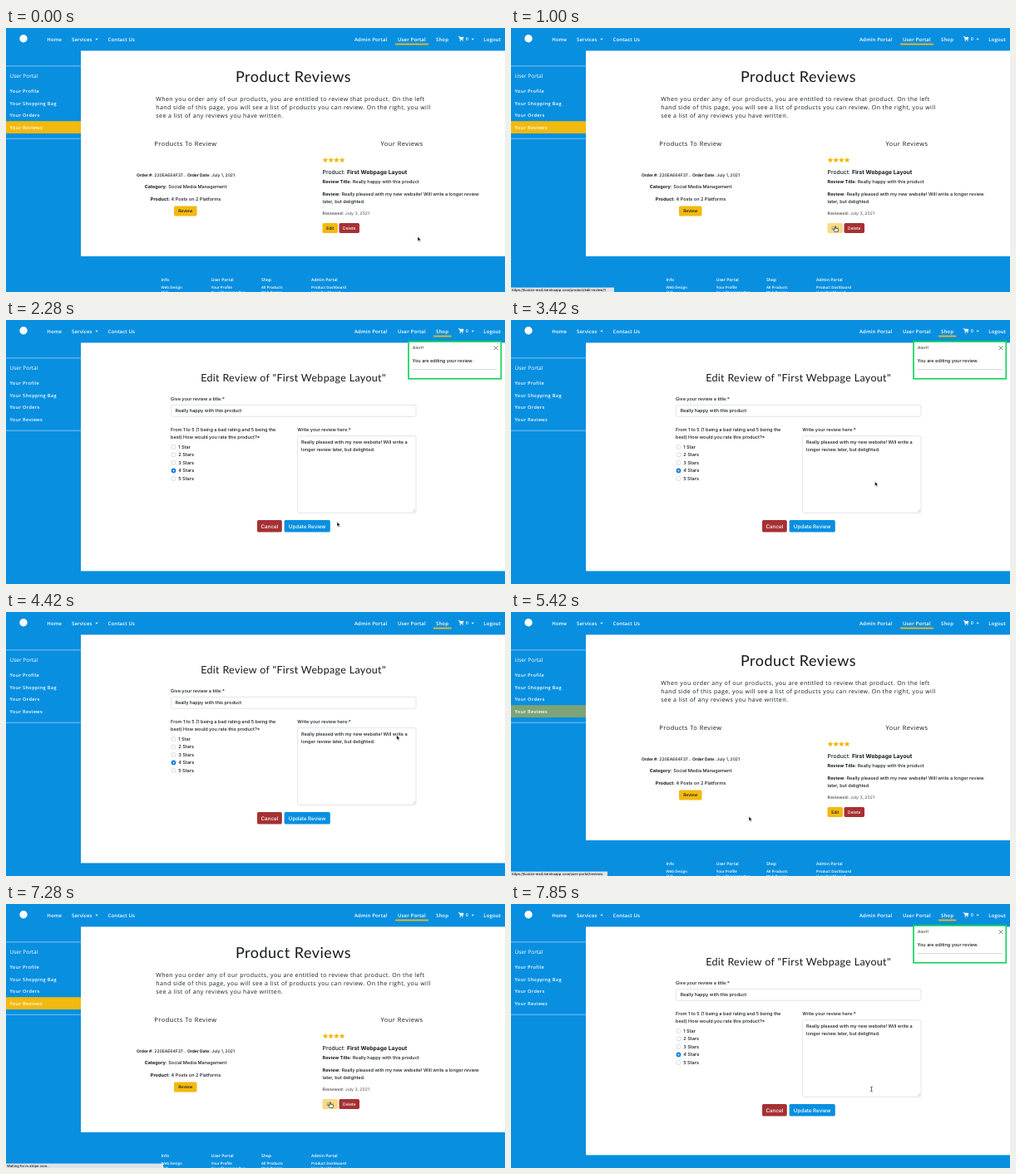
Recreate the animation shown at these times as an HTML page. Size 600 by 318 pixels, loop 8 s.

```html
<!DOCTYPE html>
<html lang="en">
<head>
<meta charset="utf-8">
<title>Product Reviews</title>
<style>
html, body { margin: 0; width: 100%; height: 100%; overflow: hidden; background: #088fe0; }
svg { display: block; width: 100%; height: 100%; }
text { font-family: Inter, sans-serif; font-weight: 500; fill: #16191c; white-space: pre; text-rendering: geometricPrecision; }
.open { font-family: "Open Sans", sans-serif; font-weight: 400; }
.lato { font-family: Lato, sans-serif; font-weight: 400; }
.white { fill: #fff; }
.nav { font-weight: 600; letter-spacing: .12px; }
.side { font-weight: 600; letter-spacing: .34px; }
.foot { font-weight: 600; }
.wide { letter-spacing: .43px; }
.mid { text-anchor: middle; }
.b { font-weight: 700; }
</style>
</head>
<body>
<svg id="stage" viewBox="0 0 600 318" preserveAspectRatio="none"></svg>
<script>
const BLUE = '#088fe0', GOLD = '#f2b90f', RED = '#a63033', LINE = '#d6dade', RADIO = '#0a78e4';
const PRODUCT = 'First Webpage Layout';
const SITE = 'https://lionize-ms4.herokuapp.com/';
const TICK = 8000 / 56;

// y is the middle of the capitals
const text = (x, y, size, str, cls = '', extra = '') =>
  `<text x="${x}" y="${y + size * .36}" font-size="${size}" class="${cls}" ${extra}>${str}</text>`;
const rect = (x, y, w, h, fill, extra = '') =>
  `<rect x="${x}" y="${y}" width="${w}" height="${h}" fill="${fill}" ${extra}/>`;
const group = (id, body) => `<g id="${id}">${body}</g>`;
const bold = s => `<tspan class="b">${s}</tspan>`;
const button = (x, y, w, h, fill, size, label, cls = 'white') =>
  rect(x, y, w, h, fill, 'rx="1.7"') + text(x + w / 2, y + h / 2, size, label, cls + ' mid');
const field = (x, y, w, h) => rect(x, y, w, h, '#fff', `rx="2" stroke="${LINE}" stroke-width=".7"`);
const nav = (x, str) => text(x, 13.5, 6, str, 'open nav white');
const caret = x => `<path d="M${x} 12.8h3.4l-1.7 1.8z" fill="#fff"/>`;

function star(cx, cy) {
  const pts = [];
  for (let i = 0; i < 10; i++) {
    const r = i % 2 ? 1.65 : 3.4, a = i * Math.PI / 5;
    pts.push((cx + r * Math.sin(a)).toFixed(2) + ',' + (cy - r * Math.cos(a)).toFixed(2));
  }
  return `<polygon points="${pts.join(' ')}" fill="${GOLD}"/>`;
}

const header =
  group('icons',
    '<circle cx="21" cy="12.8" r="4.7" fill="#fff"/>' +
    '<path d="M543.8 10.2h1.3l.9 3.7h3.3l.7-2.8h-4.6z" fill="#fff" stroke="#fff" stroke-width=".5"/>' +
    '<circle cx="546.2" cy="15.2" r=".7" fill="#fff"/><circle cx="549" cy="15.2" r=".7" fill="#fff"/>') +
  group('navLeft', nav(49.3, 'Home') + nav(79, 'Services') + caret(107.3) + nav(122.5, 'Contact Us')) +
  group('navRight', nav(419, 'Admin Portal') + nav(471, 'User Portal') + nav(517, 'Shop')) +
  group('navEnd', text(552.7, 13.5, 5.4, '0', 'open nav white') + caret(559.5) + nav(574.3, 'Logout')) +
  rect(468, 18.6, 40, 1.8, GOLD, 'id="lineUser"') +
  rect(514, 18.6, 21.5, 1.8, GOLD, 'id="lineShop"');

const stripe = y => rect(0, y, 90, 1.5, '#58b2e9');
const sidebar = stripe(45) + stripe(132.6) +
  rect(0, 112.2, 90, 14.8, GOLD, 'id="active"') +
  text(4.5, 57.6, 6.5, 'User Portal', 'open white') +
  ['Your Profile', 'Your Shopping Bag', 'Your Orders', 'Your Reviews']
    .map((s, i) => text(4.5, 76 + i * 14.6, 5.6, s, 'open side white')).join('');

const footer = [
  ['Info', 'Web Design', 'SEO'],
  ['User Portal', 'Your Profile', 'Your Shopping Bag'],
  ['Shop', 'All Products', 'Web Design'],
  ['Admin Portal', 'Product Dashboard', 'User Dashboard']
].map((col, c) => col.map((s, r) =>
  text(186.5 + c * 60.2, [303, 312.2, 318.8][r], r ? 4.5 : 5, s, 'open foot white')).join('')).join('');

const reviews = rect(90, 27.4, 510, 247.6, '#fff') +
  text(345.5, 59, 18, 'Product Reviews', 'lato mid', 'letter-spacing=".5"') +
  ['When you order any of our products, you are entitled to review that product. On the left',
   'hand side of this page, you will see a list of products you can review. On the right, you will',
   'see a list of any reviews you have written.']
    .map((s, i) => text(180.3, 85.5 + i * 10.2, 7, s, 'open wide')).join('') +
  text(216, 139, 7.4, 'Products To Review', 'open mid', 'letter-spacing=".5"') +
  text(476, 139, 7.4, 'Your Reviews', 'open mid', 'letter-spacing=".5"') +
  text(216, 177, 5, bold('Order #:') + ' 220EAE64F37... ' + bold('Order Date:') + ' July 1, 2021', 'mid') +
  text(216, 191, 5.55, bold('Category:') + ' Social Media Management', 'mid') +
  text(216, 205.8, 5.55, bold('Product:') + ' 4 Posts on 2 Platforms', 'mid') +
  button(202, 214.5, 27.5, 12, GOLD, 5, 'Review', '') +
  [0, 1, 2, 3].map(i => star(384 + i * 6.7, 159.2)).join('') +
  text(380.6, 173.8, 6.8, 'Product: ' + bold(PRODUCT)) +
  text(380.6, 185.2, 5.55, bold('Review Title:') + ' Really happy with this product') +
  text(380.6, 199.8, 5.55, bold('Review:') + ' Really pleased with my new website! Will write a longer review') +
  text(380.6, 208.6, 5.55, 'later, but delighted.') +
  text(380.6, 223.6, 5.1, bold('Reviewed:') + ' July 3, 2021', '', 'opacity=".65"') +
  group('edit', button(380.5, 235, 18.5, 12, GOLD, 5, 'Edit', '')) +
  button(400.5, 235, 24.5, 12, RED, 5, 'Delete') +
  footer;

const radio = (s, i) => {
  const y = 152.8 + i * 9.55, on = i === 3;
  return `<circle cx="201.5" cy="${y}" r="2.6" fill="${on ? RADIO : '#fff'}" stroke="${on ? RADIO : '#c0c5ca'}" stroke-width=".6"/>` +
    (on ? `<circle cx="201.5" cy="${y}" r="1" fill="#fff"/>` : '') + text(207.2, y, 5.6, s);
};
const form = rect(90, 27.4, 510, 275, '#fff') +
  text(345.5, 69.5, 12.5, `Edit Review of "${PRODUCT}"`, 'lato mid', 'letter-spacing=".32"') +
  text(198, 95.4, 5.55, 'Give your review a title:*') +
  field(198.4, 102.4, 294.6, 13.8) +
  text(203.4, 109.5, 5.55, 'Really happy with this product') +
  text(198, 132.2, 5.55, 'From 1 to 5 (1 being a bad rating and 5 being the') +
  text(198, 141, 5.55, 'best) How would you rate this product?*') +
  ['1 Star', '2 Stars', '3 Stars', '4 Stars', '5 Stars'].map(radio).join('') +
  text(350.3, 132.2, 5.55, 'Write your review here:*') +
  field(350.6, 139.6, 142.4, 92.8) +
  text(355, 146.8, 5.55, 'Really pleased with my new website! Will write a') +
  text(355, 155.6, 5.55, 'longer review later, but delighted.') +
  '<path d="M489 231.2l3-3M490.8 231.2l1.2-1.2" stroke="#888" stroke-width=".4"/>' +
  button(302, 241, 29.8, 14.5, RED, 6.25, 'Cancel') +
  button(334.6, 241, 55.2, 14.5, BLUE, 6.25, 'Update Review');

const alertBox = rect(484, 26, 111.3, 44.8, '#fff', 'stroke="#16d45c" stroke-width="1.7"') +
  text(488.8, 33.6, 4.9, 'Alert!', 'b', 'opacity=".65"') +
  '<path d="M586.7 31.2l4.8 4.8m0-4.8l-4.8 4.8" stroke="#555" stroke-width=".8"/>' +
  text(488.6, 49.5, 5.55, 'You are editing your review.') +
  rect(488.5, 59, 102, .8, '#c9cdd1');

document.getElementById('stage').innerHTML =
  rect(0, 0, 600, 318, BLUE) +
  group('page', group('reviews', reviews) + group('form', form) + sidebar) +
  header + group('alert', alertBox) +
  group('status', rect(0, 312.6, 116, 6, '#dfe3e7', 'id="bar"') + text(1, 315.9, 4.1, '', '', 'id="link"')) +
  group('cursor',
    '<path id="arrow" d="M0 0v5.4l1.3-1.2.9 2 1-.45-.9-1.9h1.7z" fill="#000" stroke="#fff" stroke-width=".5"/>' +
    '<path id="hand" d="M-.6 0q.7-.8 1.2 0v2.3l2.6.6q.7.3.5 1.2l-.5 2.2h-3.8l-1.9-2.6q0-.9 1-.5l.9.7z" fill="#fff" stroke="#000" stroke-width=".6"/>' +
    '<path id="beam" d="M-1.3-2.8q1.3 0 1.3.7v4.2q0 .7-1.3.7M1.3-2.8q-1.3 0-1.3.7M0 2.1q0 .7 1.3.7" fill="none" stroke="#222" stroke-width=".7"/>');

const $ = id => document.getElementById(id);
const show = (id, v) => $(id).setAttribute('opacity', +v);
const move = (id, x, y) => $(id).setAttribute('transform', `translate(${x} ${y})`);

// [tick, x, y]
const path = [[0, 495, 251.3], [2, 480, 251], [7, 390, 239], [11, 390, 239], [12, 390, 241.3], [16, 398, 243.3],
  [19, 400, 244], [27, 460, 165], [31, 469.7, 148.5], [36, 40, 118], [37, 40, 118], [38, 286, 246.3],
  [43, 292, 247], [50, 389.8, 239], [52, 389.8, 239], [55, 433.5, 223]];

function cursorAt(n) {
  const i = Math.max(1, path.findIndex(p => p[0] >= n));
  const [a, b] = [path[i - 1], path[i]], k = (n - a[0]) / (b[0] - a[0]);
  return [a[1] + (b[1] - a[1]) * k, a[2] + (b[2] - a[2]) * k];
}

function status(n) {
  if (n >= 7 && n <= 12) return [SITE + 'product/edit-review/1', 124, n === 12 ? .45 : 1];
  if (n >= 36 && n <= 39) return [SITE + 'user-portal/reviews', 116, n === 39 ? .45 : 1];
  if (n >= 49 && n <= 52) return ['Waiting for m.stripe.com...', 189, 1];
  return ['', 0, 0];
}

function draw(n) {
  const editing = n >= 12 && n < 38 || n >= 53;
  const bare = n === 12 || n === 53; // icon font still loading
  const onEdit = n >= 7 && n < 12 || n >= 50 && n < 53;
  const onLink = n === 36 || n === 37;

  show('reviews', !editing);
  show('form', editing);
  move('page', 0, bare ? -1.8 : 0);
  show('icons', !bare);
  move('navLeft', bare ? -9.7 : 0, bare ? -.9 : 0);
  move('navRight', bare ? 9 : 0, bare ? -.9 : 0);
  move('navEnd', 0, bare ? -.9 : 0);
  show('lineUser', !editing);
  show('lineShop', editing && !bare);
  show('active', n === 36 || n === 38 ? .5 : !editing || onLink);
  show('edit', onEdit ? .5 : 1);
  show('alert', n === 14 || n === 27 || n === 54 ? .5 : n > 14 && n < 27 || n === 55);

  const [label, width, alpha] = status(n);
  $('link').textContent = label;
  $('bar').setAttribute('width', width);
  show('status', alpha);

  move('cursor', ...cursorAt(n));
  const beam = n >= 54, hand = onEdit || onLink;
  show('beam', beam);
  show('hand', hand);
  show('arrow', !beam && !hand);
}

function frame(now) {
  draw(Math.floor((now % 8000 + 10) / TICK) % 56);
  requestAnimationFrame(frame);
}
draw(0);
requestAnimationFrame(frame);
</script>
</body>
</html>
```
